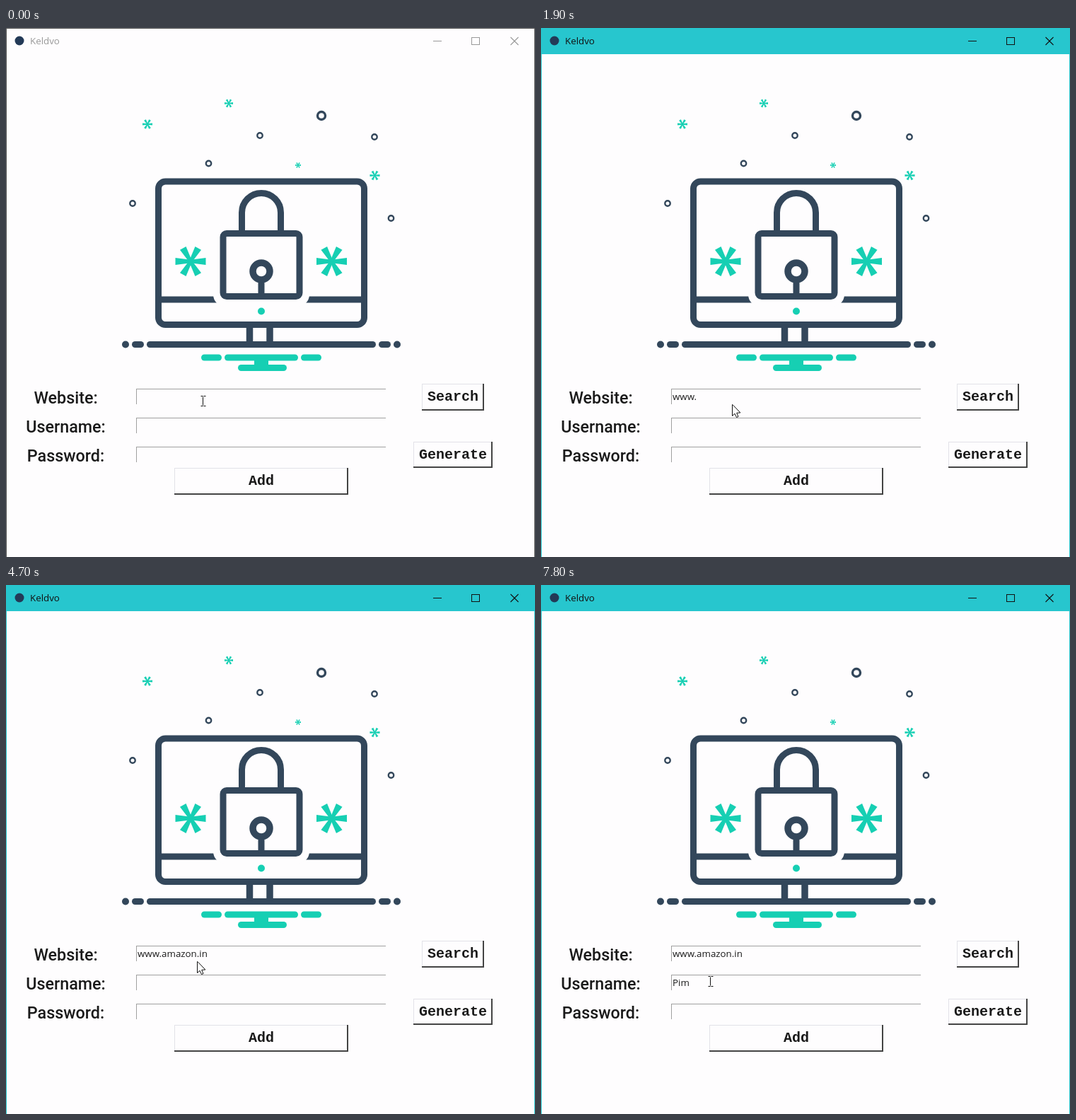
An HTML page with a canvas for the animation above (8 s loop, 748 by 748 pixels).

```html
<!DOCTYPE html>
<html lang="en">
<head>
<meta charset="utf-8">
<title>Password manager</title>
<style>
  html, body { margin: 0; width: 100%; height: 100%; overflow: hidden; background: #fefdfe; }
  canvas { display: block; }
</style>
</head>
<body>
<canvas id="stage" width="748" height="748"></canvas>
<script>
const ctx = document.getElementById('stage').getContext('2d');
const LOOP = 8000, STEP = 100;
const PAPER = '#fefdfe', NAVY = '#33475b', TEAL = '#16cfb3', BAR = '#27c6ce';
const ENTRY_FONT = '13.33px "Open Sans", sans-serif';
const FOCUS = 400, CLICK = 6100;

// Each entry: text, key times in ms, times at which the caret toggles
const website = {
  y: 510, text: 'www.amazon.in',
  keys: [800, 1300, 1500, 1700, 2300, 2400, 2600, 2900, 3000, 3200, 4100, 4200, 4400],
  blinks: [FOCUS, 1000, 1300, 1900, 2200, 2800, 3100, 3800, 4100, 4700, 5000, 5600, 5900, CLICK]
};
const username = {
  y: 551, text: 'Pim',
  keys: [7400, 7600, 7800],
  blinks: [CLICK, 6700, 7000, 7600]
};
const password = { y: 592, text: '', keys: [], blinks: [] };

// Pointer path: time, x, y, shape
const pointerPath = [
  [0, 278, 527, 'beam'], [100, 274, 530, 'beam'], [200, 270, 532, 'arrow'],
  [5000, 268, 536, 'arrow'], [5100, 264, 545, 'arrow'], [5200, 258, 556, 'beam'],
  [5300, 252, 567, 'beam'], [5400, 247, 578, 'arrow'], [5500, 244, 584, 'arrow'],
  [5600, 242, 586, 'arrow'], [5700, 240, 576, 'arrow'], [5800, 239, 560, 'beam']
];

const countPast = (times, t) => times.filter(k => k <= t).length;

function line(x1, y1, x2, y2, width, color, cap = 'butt') {
  ctx.beginPath();
  ctx.moveTo(x1, y1);
  ctx.lineTo(x2, y2);
  ctx.lineWidth = width;
  ctx.strokeStyle = color;
  ctx.lineCap = cap;
  ctx.stroke();
}

function box(x, y, w, h, color) {
  ctx.fillStyle = color;
  ctx.fillRect(x, y, w, h);
}

function frame(x1, y1, x2, y2, radius, width, color) {
  ctx.beginPath();
  ctx.roundRect(x1, y1, x2 - x1, y2 - y1, radius);
  ctx.lineWidth = width;
  ctx.strokeStyle = color;
  ctx.stroke();
}

function disc(x, y, r, color) {
  ctx.beginPath();
  ctx.arc(x, y, r, 0, Math.PI * 2);
  ctx.fillStyle = color;
  ctx.fill();
}

function ring(x, y, r, width) {
  ctx.beginPath();
  ctx.arc(x, y, r, 0, Math.PI * 2);
  ctx.lineWidth = width;
  ctx.strokeStyle = NAVY;
  ctx.stroke();
}

function label(text, x, y, font, color, align = 'center') {
  ctx.font = font;
  ctx.fillStyle = color;
  ctx.textAlign = align;
  ctx.fillText(text, x, y);
}

function asterisk(x, y, r) {
  ctx.fillStyle = TEAL;
  for (let i = 0; i < 6; i++) {
    ctx.save();
    ctx.translate(x, y);
    ctx.rotate(i * Math.PI / 3);
    ctx.beginPath();
    ctx.moveTo(0, -0.1 * r);
    ctx.lineTo(r, -0.23 * r);
    ctx.lineTo(r, 0.23 * r);
    ctx.lineTo(0, 0.1 * r);
    ctx.fill();
    ctx.restore();
  }
}

function dash(x1, x2, y, color) {
  line(x1 + 4.5, y, x2 - 4.5, y, 9, color, 'round');
}

function drawIllustration() {
  for (const [x, y, r] of [[200, 136, 7], [315, 106.5, 6], [413, 194, 4], [521.5, 208.5, 7], [261, 330, 21.5], [460.5, 330, 21.5]]) asterisk(x, y, r);
  for (const [x, y] of [[359, 152], [521, 154], [286.5, 191.5], [179, 248], [544.5, 269]]) ring(x, y, 3.7, 2.4);
  ring(446, 124, 5.5, 3.4);

  // Monitor and stand
  frame(215.5, 217, 506.5, 419.5, 10, 9, NAVY);
  line(216, 384, 506, 384, 9, NAVY);
  for (const x of [344.5, 373]) line(x, 420, x, 447, 9.5, NAVY);
  dash(199, 523, 447.5, NAVY);
  dash(178, 195, 447.5, NAVY);
  dash(527, 544, 447.5, NAVY);
  disc(169, 447.5, 5, NAVY);
  disc(553, 447.5, 5, NAVY);
  disc(361, 400.5, 5, TEAL);

  // Padlock on a paper-coloured halo
  ctx.beginPath();
  ctx.roundRect(293, 276, 136, 118, 17);
  ctx.fillStyle = PAPER;
  ctx.fill();
  frame(307, 290.5, 415, 379.5, 5, 9, NAVY);
  ctx.beginPath();
  ctx.moveTo(333.5, 290);
  ctx.arc(361, 261, 27.5, Math.PI, 0);
  ctx.lineTo(388.5, 290);
  ctx.lineWidth = 9;
  ctx.lineCap = 'butt';
  ctx.stroke();
  ring(361, 344, 12, 9.5);
  line(361, 357, 361, 380, 9, NAVY);

  // Reflection
  dash(276, 305, 466, TEAL);
  dash(309, 413, 466, TEAL);
  dash(417, 446, 466, TEAL);
  dash(328, 397, 480.5, TEAL);
  box(351, 466, 20, 14, TEAL);
}

function drawWindow(active) {
  const ink = active ? '#111' : '#999';
  const edge = active ? BAR : '#555';
  if (active) box(0, 0, 748, 37, BAR);
  line(0, 0.5, 748, 0.5, 1, edge);
  line(0.5, 0, 0.5, 748, 1, edge);
  line(747.5, 0, 747.5, 748, 1, edge);
  disc(19, 18, 6.5, '#233a57');
  label('Keldvo', 34, 23, '13.33px "Open Sans", sans-serif', ink, 'left');
  line(604, 18.5, 616, 18.5, 1, ink);
  ctx.lineWidth = 1;
  ctx.strokeRect(658.5, 13.5, 11, 10);
  line(713.5, 13, 724.5, 24, 1.1, ink);
  line(724.5, 13, 713.5, 24, 1.1, ink);
}

function drawButton(text, x1, y1, x2, y2, baseline) {
  box(x1, y1, x2 - x1, 1, '#e2e2e8');
  box(x1, y1, 1, y2 - y1, '#e2e2e8');
  box(x1, y2 - 2, x2 - x1, 2, '#444');
  box(x2 - 2, y1, 2, y2 - y1, '#444');
  label(text, (x1 + x2) / 2, baseline, 'bold 20px "Liberation Mono", monospace', '#1a1a1a');
}

function drawEntry({ y, text, keys, blinks }, t) {
  box(184, y, 353, 1, '#a0a0a0');
  box(184, y, 1, 22, '#a0a0a0');
  const typed = text.slice(0, countPast(keys, t));
  label(typed, 186, y + 16, ENTRY_FONT, '#1a1a1a', 'left');
  if (countPast(blinks, t) % 2) {
    const end = Math.round(185 + ctx.measureText(typed).width);
    box(end, y + 2, 2, 18, '#000');
  }
}

function drawPointer(t) {
  const [, x, y, shape] = pointerPath[countPast(pointerPath.map(p => p[0]), t) - 1];
  ctx.save();
  ctx.translate(x + 0.5, y + 0.5);
  if (shape === 'beam') {
    line(0, -6, 0, 6, 1, '#111');
    for (const end of [-7, 7]) {
      line(-3, end, 0, end, 1, '#111');
      line(1, end, 4, end, 1, '#111');
    }
  } else {
    ctx.beginPath();
    for (const [px, py] of [[0, 0], [0, 16], [3.5, 12.8], [6, 18], [8.5, 17], [6.2, 11.8], [11, 11.5]]) ctx.lineTo(px, py);
    ctx.closePath();
    ctx.fillStyle = '#fff';
    ctx.fill();
    ctx.lineWidth = 1;
    ctx.strokeStyle = '#111';
    ctx.stroke();
  }
  ctx.restore();
}

function render(now) {
  const t = Math.floor((now % LOOP) / STEP) * STEP;
  box(0, 0, 748, 748, PAPER);
  drawWindow(t >= FOCUS);
  drawIllustration();
  ['Website:', 'Username:', 'Password:'].forEach((text, i) =>
    label(text, 84.5, 531 + i * 41, '500 23.3px Roboto, sans-serif', '#1a1a1a'));
  for (const entry of [website, username, password]) drawEntry(entry, t);
  drawButton('Search', 588, 503, 676, 541, 527);
  drawButton('Generate', 576, 585, 688, 622, 609);
  drawButton('Add', 238, 622, 484, 660, 646);
  drawPointer(t);
  requestAnimationFrame(render);
}
requestAnimationFrame(render);
</script>
</body>
</html>
```
